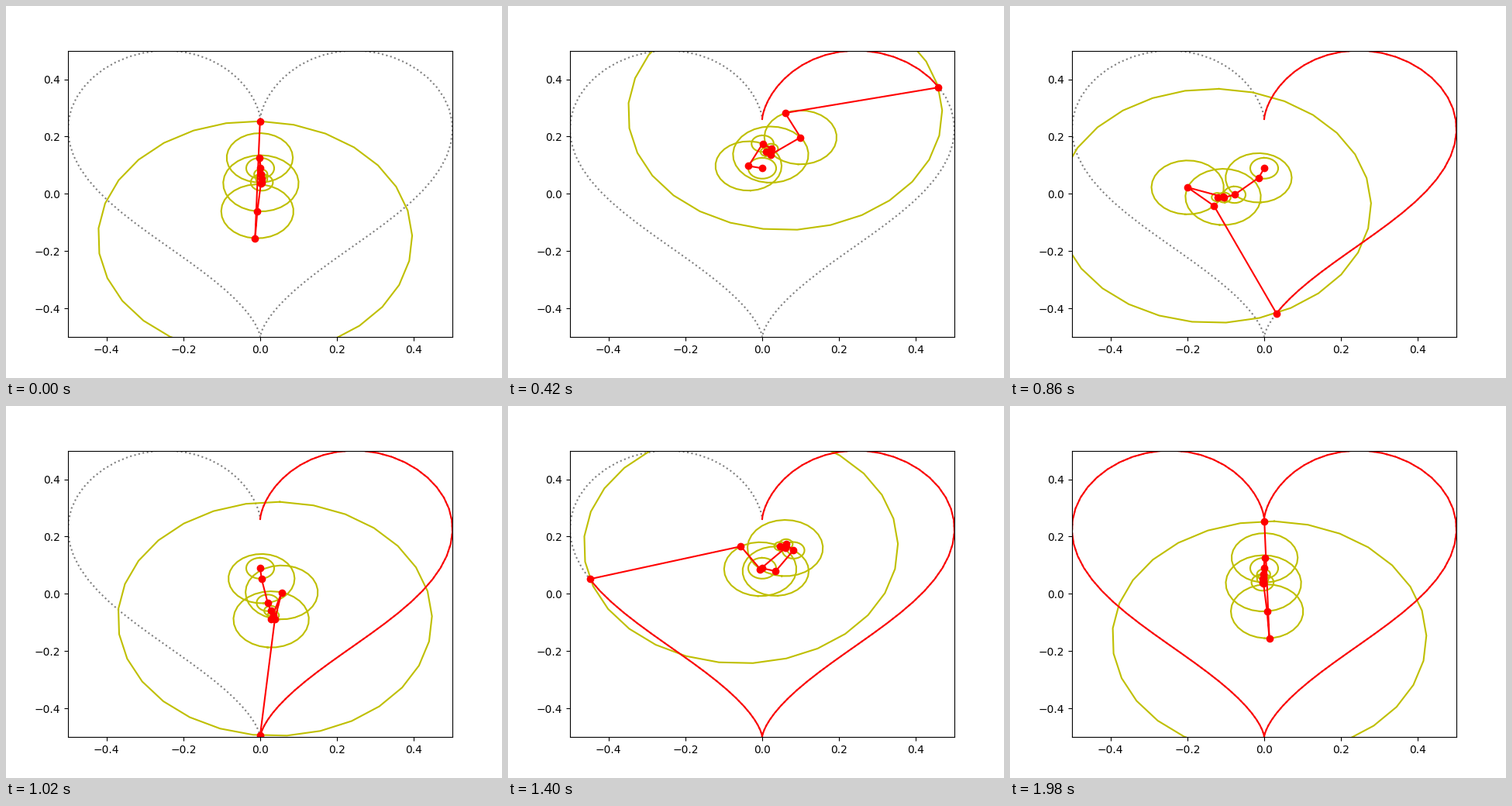
A matplotlib script for the animation above (2 s loop, 640 by 480 pixels).

```python
import numpy as np
import matplotlib.pyplot as plt
from matplotlib.animation import FuncAnimation

N = 100
ORDER = 4  # highest harmonic kept on each side


def unit(v):
    """Scale values to the range -0.5 .. 0.5."""
    return (v - v.min()) / (v.max() - v.min()) - 0.5


t = np.linspace(0, 2 * np.pi, N)
x = 16 * np.sin(t) ** 3
y = 13 * np.cos(t) - 5 * np.cos(2 * t) - 2 * np.cos(3 * t) - np.cos(4 * t)
heart = unit(x) + 1j * unit(y)

# Harmonics in FFT order: 0, 1 .. ORDER, -ORDER .. -1
freqs = np.r_[0:ORDER + 1, -ORDER:0]
coefs = (np.fft.fft(heart) / N)[freqs]
ring = np.exp(1j * np.linspace(0, 2 * np.pi, 30))

fig, ax = plt.subplots(figsize=(6.4, 4.8), dpi=100)
ax.set_xlim(-0.5, 0.5)
ax.set_ylim(-0.5, 0.5)

ax.plot(heart.real, heart.imag, ":", color="gray")
circles = [ax.plot([], [], "y-")[0] for _ in coefs[1:]]
trace, = ax.plot([], [], "r-")
arms, = ax.plot([], [], "ro-")


def put(line, z):
    line.set_data(z.real, z.imag)


def update(i):
    joints = np.cumsum(coefs * np.exp(2j * np.pi * freqs * i / N))
    for circle, center, c in zip(circles, joints, coefs[1:]):
        put(circle, center + c * ring)
    put(trace, heart[:i + 1])
    put(arms, joints)
    return [*circles, trace, arms]


anim = FuncAnimation(fig, update, frames=N, interval=20, repeat=True,
                     repeat_delay=0, blit=False)
plt.show()
```
